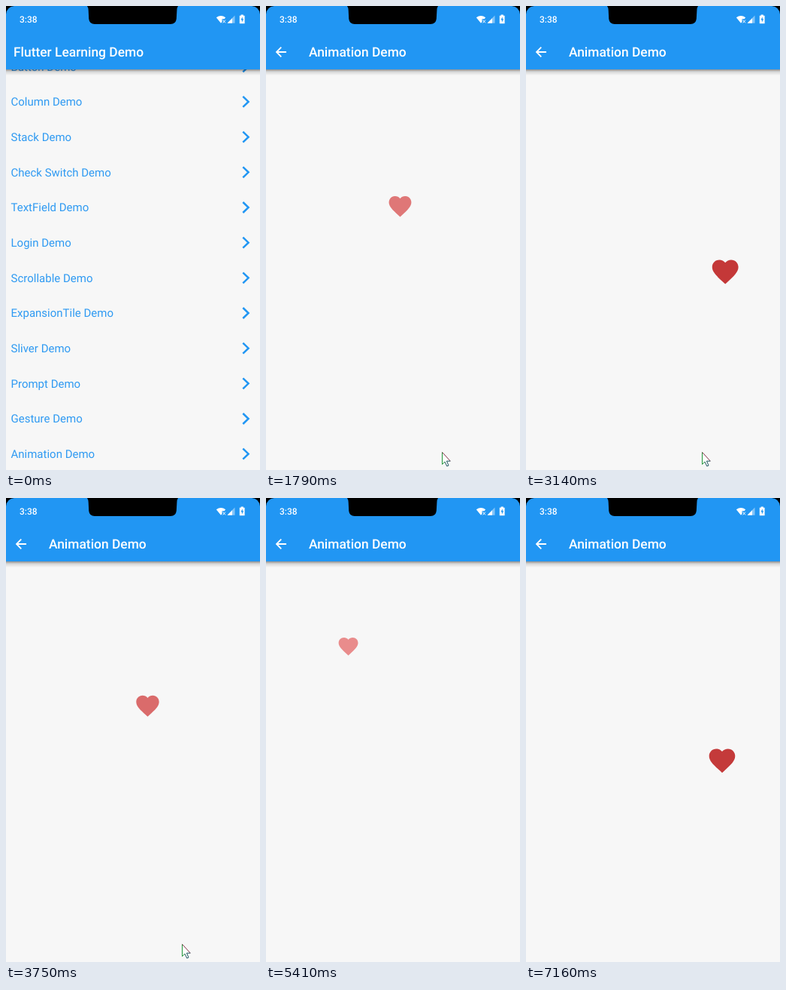
An HTML page that plays this animation: 338x615 px, repeating every 7.21 s.

```html
<!DOCTYPE html>
<html lang="en">
<head>
<meta charset="utf-8">
<title>Flutter Learning Demo</title>
<style>
  html, body { margin: 0; width: 100%; height: 100%; overflow: hidden; background: #f7f7f7; }
  svg { display: block; width: 338px; height: 615px; font-family: Roboto, sans-serif; text-rendering: geometricPrecision; }
  .title { font-size: 17.4px; font-weight: 500; fill: #fff; }
  .rows { font-size: 15px; fill: #2f9af2; }
  .rows path { fill: none; stroke: #2196f3; stroke-width: 2.5; }
</style>
</head>
<body>
<svg viewBox="0 0 338 615">
  <defs>
    <linearGradient id="shade" x2="0" y2="1">
      <stop offset="0" stop-opacity=".42"/>
      <stop offset=".4" stop-opacity=".13"/>
      <stop offset="1" stop-opacity="0"/>
    </linearGradient>
    <clipPath id="lastRow"><rect y="570.4" width="338" height="45"/></clipPath>
    <g id="appBar">
      <rect y="84" width="338" height="8" fill="url(#shade)"/>
      <rect width="338" height="84" fill="#2196f3"/>
    </g>
  </defs>

  <g id="home">
    <rect width="338" height="615" fill="#f7f7f7"/>
    <g clip-path="url(#lastRow)"><circle id="splash" cx="234" cy="591" fill="#c8c8c8"/></g>
    <g id="rows" class="rows"></g>
    <use href="#appBar"/>
    <text class="title" x="10" y="66.6">Flutter Learning Demo</text>
  </g>

  <g id="page">
    <rect width="338" height="615" fill="#f7f7f7"/>
    <use href="#appBar"/>
    <path d="M27 61H14.5M20.3 54.6L14 61l6.3 6.4" fill="none" stroke="#fff" stroke-width="1.8"/>
    <text class="title" x="57" y="66.6">Animation Demo</text>
    <path id="heart" d="M12 21.35l-1.45-1.32C5.4 15.36 2 12.28 2 8.5 2 5.42 4.42 3 7.5 3c1.74 0 3.41.81 4.5 2.09C13.09 3.81 14.76 3 16.5 3 19.58 3 22 5.42 22 8.5c0 3.78-3.4 6.86-8.55 11.54z"/>
  </g>

  <g fill="#fff">
    <text x="18" y="22.2" font-size="12" font-weight="500">3:38</text>
    <path d="M279.8 15.2Q286 10.6 292.2 15.2L290.5 17.2H287.5V21L286 22.8Z"/>
    <path d="M288.6 18.6l3.4 3.8m0-3.8l-3.4 3.8" stroke="#fff" stroke-width="1"/>
    <path d="M304.5 12.5V22.8H294.5Z" opacity=".45"/>
    <path d="M301 16.2V22.8H294.5Z"/>
    <path d="M312.6 12.8V11.6H315.8V12.8H317.6V23.2H310.8V12.8Z"/>
    <path d="M314.8 14.2l-2.4 4.3h1.5v3.2l2.3-4.4h-1.4z" fill="#2196f3"/>
  </g>
  <path d="M108 0Q109.5 2 109.7 6L110.2 17Q111 24 118 24H219Q226 24 226.8 17L227.4 6Q227.5 2 229 0ZM0 0H11Q1 1 0 11ZM338 0V11Q337 1 327 0Z"/>

  <g id="cursor" fill="none">
    <path d="M.5 .5V16.5L4 13.2 6.8 19 9 18 6.4 12.2H11.3Z" fill="#fff"/>
    <path d="M.5 .5V16.5L4 13.2" stroke="#23963c"/>
    <path d="M.5 .5L11.3 12.2" stroke="#7d2b42"/>
    <path d="M4 13.2L6.8 19 9 18 6.4 12.2H11.3" stroke="#1f5560"/>
  </g>
</svg>
<script>
const LOOP = 7210, START = 856, LEG = 2000;
const [home, page, rows, splash, heart, cursor] =
  ['home', 'page', 'rows', 'splash', 'heart', 'cursor'].map(id => document.getElementById(id));

rows.innerHTML = ['Button', 'Column', 'Stack', 'Check Switch', 'TextField', 'Login', 'Scrollable',
  'ExpansionTile', 'Sliver', 'Prompt', 'Gesture', 'Animation'].map((name, i) => {
    const y = 80.3 + i * 46.67;
    return `<text x="6.5" y="${y + 5.4}">${name} Demo</text><path d="M315.3 ${y - 7}l7.3 7-7.3 7"/>`;
  }).join('');

const mix = (a, b, p) => a + (b - a) * p;
const span = (t, from, to) => Math.min(1, Math.max(0, (t - from) / (to - from)));

function cubic(x1, y1, x2, y2) {
  const at = (a, b, s) => 3 * a * s * (1 - s) ** 2 + 3 * b * s * s * (1 - s) + s ** 3;
  return x => {
    let lo = 0, hi = 1;
    for (let i = 0; i < 24; i++) {
      const mid = (lo + hi) / 2;
      if (at(x1, x2, mid) < x) lo = mid; else hi = mid;
    }
    return at(y1, y2, lo);
  };
}
const easeIn = cubic(.42, 0, 1, 1);
const fastOutSlowIn = cubic(.4, 0, .2, 1);

function bounce(t) {
  const k = 7.5625, d = 2.75;
  if (t < 1 / d) return k * t * t;
  if (t < 2 / d) return k * (t - 1.5 / d) ** 2 + .75;
  if (t < 2.5 / d) return k * (t - 2.25 / d) ** 2 + .9375;
  return k * (t - 2.625 / d) ** 2 + .984375;
}
const bounceInOut = t => t < .5 ? (1 - bounce(1 - 2 * t)) / 2 : (1 + bounce(2 * t - 1)) / 2;

function drawHeart(t) {
  const cycle = Math.max(0, t - START) / LEG % 2;
  const v = cycle < 1 ? cycle : 2 - cycle;
  const p = bounceInOut(v), tint = easeIn(v);
  const x = mix(94.5, 268, p), scale = mix(25, 35, p) / 20;
  heart.setAttribute('transform', `translate(${x} ${x + 87.3}) scale(${scale}) translate(-12 -12.175)`);
  heart.setAttribute('fill', `rgb(${mix(239, 183, tint)},${mix(154, 28, tint)},${mix(154, 28, tint)})`);
}

function drawPage(t) {
  const p = span(t, 908, 1208);
  page.setAttribute('opacity', easeIn(p));
  page.setAttribute('transform', `translate(0 ${154 * (1 - fastOutSlowIn(p))})`);
  const grow = span(t, 850, 1050);
  splash.setAttribute('r', t < 620 ? 0 : mix(15, 142, grow));
  splash.setAttribute('opacity', mix(.4, .13, grow));
}

function drawCursor(t) {
  const away = t < 1000 ? 1 - span(t, 130, 440) : span(t, 4900, 5150);
  cursor.setAttribute('transform', `translate(${234 + 20 * away} ${591 + 25 * away})`);
}

function frame(now) {
  const t = now % LOOP;
  drawPage(t);
  drawHeart(t);
  drawCursor(t);
  requestAnimationFrame(frame);
}
frame(performance.now());
</script>
</body>
</html>
```
